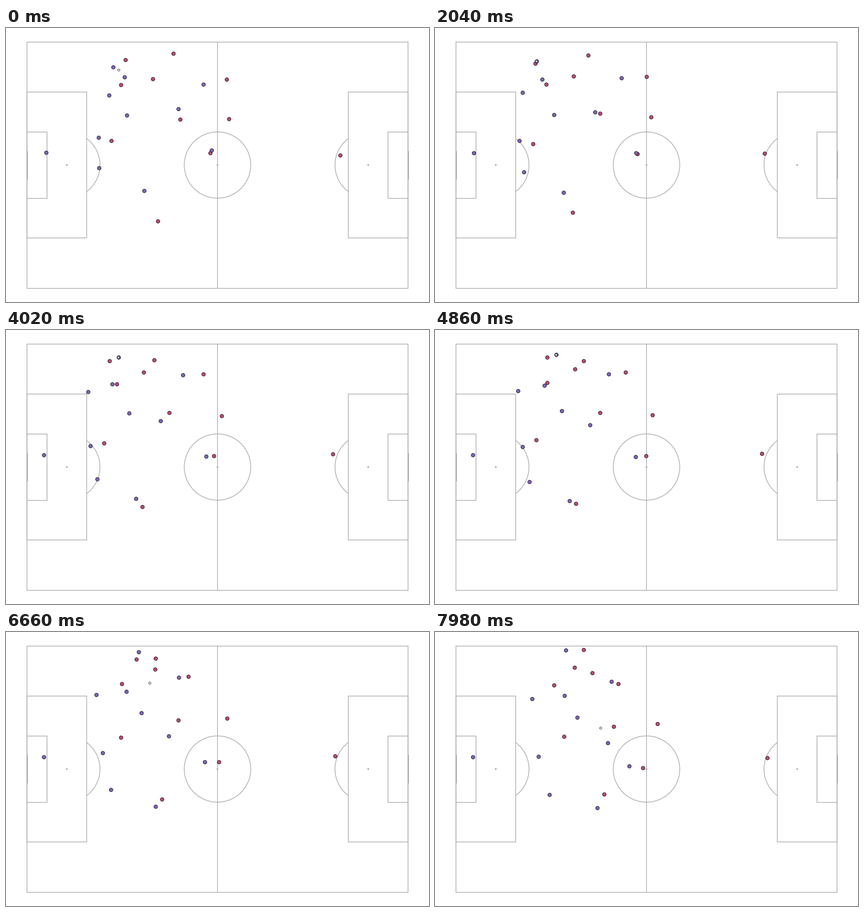
Animation of 928 by 603 pixels, one loop 8 s. Source, as a matplotlib script:

```python
import numpy as np
import matplotlib.pyplot as plt
from matplotlib.animation import FuncAnimation
from matplotlib.patches import Arc, Circle, Rectangle

W, H, DPI = 928, 603, 58
TICK, STEP, LOOP = 20, 60, 8000            # milliseconds
GREY, RED, BLUE = "#b0b0b0", "#b94b75", "#7f63b8"

fig = plt.figure(figsize=(16, 10.4), dpi=DPI, facecolor="white")
ax = fig.add_axes([0, 0, 1, 1])
ax.set_xlim(0, W)
ax.set_ylim(H, H - 10.4 * DPI)             # data units are pixels, y downwards
ax.axis("off")

# ---------- pitch, laid out in metres around the centre spot ----------
M = 7.968
CX, CY = W / 2, 10.4 * DPI / 2
LENGTH, WIDTH = 105 * M, 68 * M
line = dict(edgecolor=GREY, facecolor="none", linewidth=2)


def box(x, w, h):
    ax.add_patch(Rectangle((x, CY - h / 2), w, h, **line))


def spot(x):
    ax.add_patch(Circle((x, CY), 2, color=GREY, linewidth=0))


def upright(x, h, lw):
    ax.plot([x, x], [CY - h / 2, CY + h / 2], color=GREY, lw=lw)


box(CX - LENGTH / 2, LENGTH, WIDTH)
upright(CX, WIDTH, 2)
ax.add_patch(Circle((CX, CY), 9.15 * M, **line))
spot(CX)

half_angle = np.degrees(np.arccos(5.5 / 9.15))
for side in (-1, 1):
    goal_x = CX + side * LENGTH / 2
    for depth, height in ((16.5, 40.32), (5.5, 18.32)):
        box(min(goal_x, goal_x - side * depth * M), depth * M, height * M)
    mark = goal_x - side * 11 * M
    spot(mark)
    ax.add_patch(Arc((mark, CY), 18.3 * M, 18.3 * M, angle=90 + 90 * side,
                     theta1=-half_angle, theta2=half_angle,
                     color=GREY, linewidth=2))
    upright(goal_x, 7.32 * M, 4)

# ---------- motion: positions are complex numbers, x + y*1j ----------
t = np.arange(0, LOOP, STEP) / 1000
KNOTS = np.array([0, 3.12, 6, 7.98])       # start, turn, push on, finish


def glide(*points):
    """Natural cubic spline through one point per knot, sampled at every step."""
    p, h = np.array(points), np.diff(KNOTS)
    slope = np.diff(p) / h
    inner = np.diag(2 * (h[:-1] + h[1:])) + np.diag(h[1:-1], 1) + np.diag(h[1:-1], -1)
    bend = np.pad(np.linalg.solve(inner, 6 * np.diff(slope)), 1)
    k = np.clip(np.searchsorted(KNOTS, t, "right") - 1, 0, len(h) - 1)
    b = (t - KNOTS[k]) / h[k]
    a = 1 - b
    return (a * p[k] + b * p[k + 1]
            + ((a**3 - a) * bend[k] + (b**3 - b) * bend[k + 1]) * h[k]**2 / 6)


carrier = glide(235 + 86j, 230 + 66j, 287 + 47j, 287 + 40j)

reds = [
    glide(262 + 70j, 216 + 75j, 273 + 56j, 306 + 78j),
    glide(367 + 56j, 327 + 63j, 328 + 65j, 326 + 39j),
    glide(322 + 112j, 300 + 100j, 319 + 81j, 345 + 90j),
    glide(252 + 125j, 242 + 122j, 251 + 114j, 261 + 117j),
    glide(484 + 113j, 449 + 102j, 403 + 93j, 402 + 114j),
    glide(489 + 200j, 471 + 193j, 483 + 187j, 488 + 202j),
    glide(382 + 201j, 357 + 183j, 371 + 188j, 392 + 208j),
    glide(231 + 248j, 212 + 254j, 239 + 234j, 283 + 230j),
    glide(448 + 275j, 448 + 277j, 469 + 281j, 456 + 299j),
    glide(733 + 280j, 719 + 274j, 719 + 272j, 729 + 277j),
    glide(333 + 425j, 296 + 396j, 328 + 373j, 371 + 357j),
]
blues = [
    carrier,
    glide(260 + 108j, 230 + 116j, 255 + 127j, 284 + 140j),
    glide(226 + 148j, 182 + 139j, 191 + 135j, 213 + 147j),
    glide(265 + 192j, 264 + 188j, 290 + 176j, 312 + 188j),
    glide(433 + 124j, 397 + 104j, 377 + 97j, 387 + 109j),
    glide(378 + 178j, 342 + 192j, 349 + 222j, 379 + 244j),
    glide(203 + 241j, 182 + 252j, 204 + 262j, 227 + 274j),
    glide(88 + 274j, 84 + 275j, 83 + 275j, 83 + 275j),
    glide(204 + 308j, 195 + 323j, 221 + 342j, 251 + 358j),
    glide(303 + 358j, 279 + 366j, 315 + 382j, 356 + 387j),
    glide(451 + 269j, 439 + 277j, 439 + 282j, 426 + 295j),
]

# The ball rolls in, stays at the carrier's feet, then is passed on at even speed.
PASS = 5.78
roll_in = np.clip(1 - t / 1.1, 0, 1)
feet = carrier - 1 + (12.7 + 6j) * roll_in
flight = 291 + 63j + (36.5 + 74.8j) * (t - 6)
ball = np.where(t < PASS, feet, flight)


def dots(color, size, z):
    return ax.plot([], [], "o", ms=size, mfc=color, mec="black", mew=1, zorder=z)[0]


layers = [(dots(RED, 10, 4), np.array(reds)),
          (dots(BLUE, 10, 5), np.array(blues)),
          (dots("white", 6, 6), ball[None])]


def update(i):
    s = i * TICK // STEP
    for artist, paths in layers:
        artist.set_data(paths[:, s].real, paths[:, s].imag)
    return [artist for artist, _ in layers]


anim = FuncAnimation(fig, update, frames=LOOP // TICK, interval=TICK,
                     repeat=True, repeat_delay=0)
plt.show()
```
